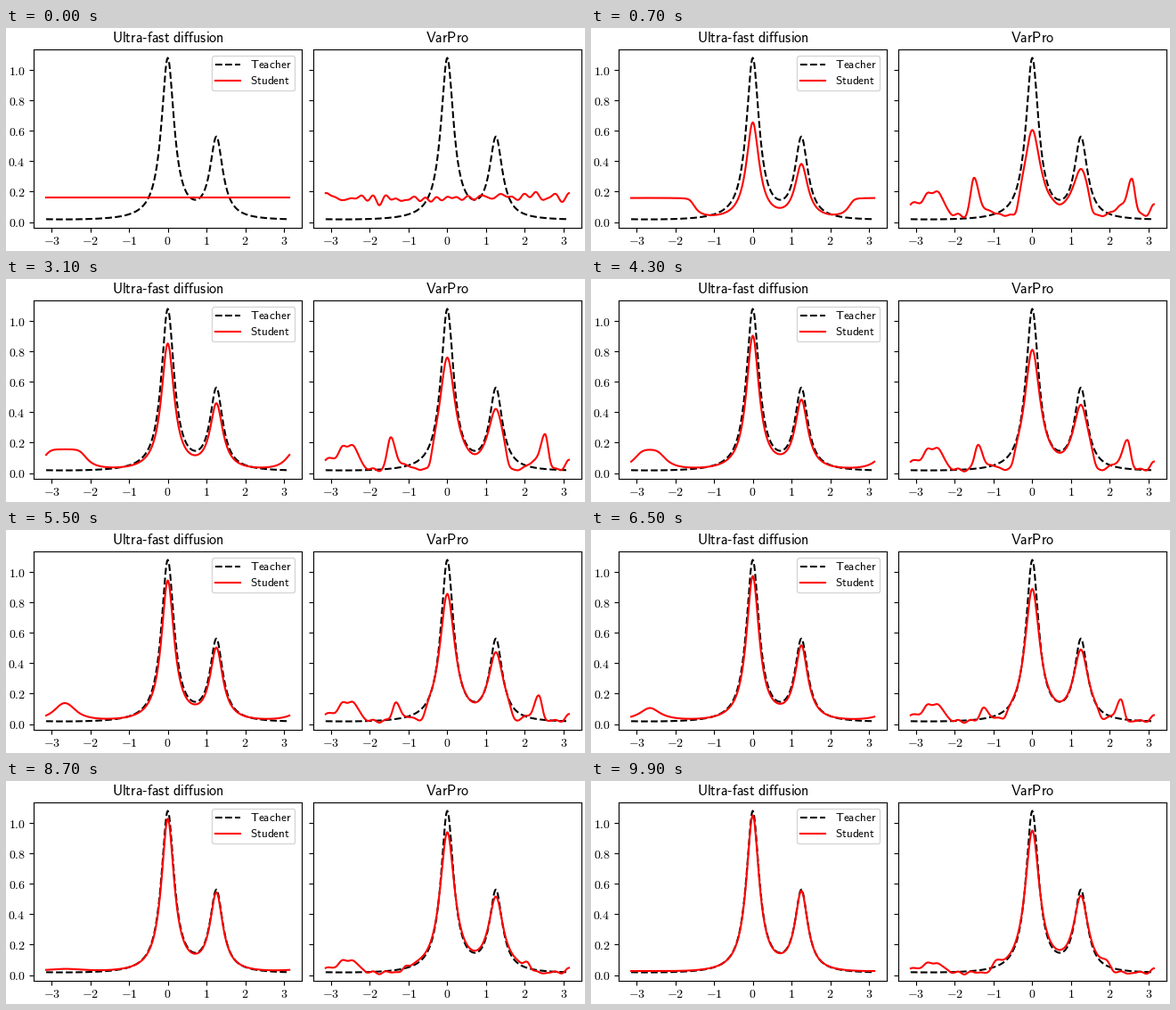
A matplotlib script for the animation above (10000 ms loop, 650 by 250 pixels).

```python
import numpy as np
import matplotlib.pyplot as plt
from matplotlib.animation import FuncAnimation

plt.rcParams.update({"font.family": "Liberation Sans", "mathtext.fontset": "cm"})

FRAMES, INTERVAL = 100, 100
N = 320
MODES = (0.0, 0.4 * np.pi)
UNIFORM = 1 / (2 * np.pi)


def kernel(x, s):
    """Poisson kernel on the circle."""
    return np.sinh(s) / (np.cosh(s) - np.cos(x)) * UNIFORM


def mixture(x, w1, w2, s):
    return w1 * kernel(x - MODES[0], s) + w2 * kernel(x - MODES[1], s)


def diffuse(g, dx, horizon=8.0, steps=480):
    """Implicit Euler for df/dt = -2 (g u_x)_x with u = g / f, from uniform f."""
    eye = np.eye(N)
    grad = (np.roll(eye, 1, axis=1) - eye) / dx
    mid = (g + np.roll(g, -1)) / 2
    flow = 2 * grad.T @ (mid[:, None] * grad)
    times = horizon * np.linspace(0, 1, steps + 1) ** 3
    f = np.full(N, UNIFORM)
    states = [f]
    for dt in np.diff(times):
        u = g / f
        for _ in range(3):
            residual = g / u - f - dt * (flow @ u)
            du = np.linalg.solve(np.diag(g / u**2) + dt * flow, residual)
            u = np.maximum(u + du, u / 3)
        f = g / u
        states.append(f)
    return times, np.array(states)


xs = np.linspace(-np.pi, np.pi, N + 1)
teacher = mixture(xs, 2 / 3, 1 / 3, 0.2)
times, states = diffuse(teacher[:-1], xs[1] - xs[0])
peaks = states[:, N // 2]

# A few heights of the main peak set the clock.
marks = np.interp([UNIFORM, 0.711, 0.944, 1.05], peaks, times)
clock = np.interp(np.arange(FRAMES), [0, 11, 55, 99], marks)


def diffusion_curve(i):
    k = np.interp(clock[i], times, np.arange(len(times)))
    lo = min(int(k), len(times) - 2)
    f = states[lo] + (k - lo) * (states[lo + 1] - states[lo])
    return np.append(f, f[0])


# Untrained network: a slow swell under random ripples.
rng = np.random.default_rng(4)
ripple = 0.0042 * sum(np.cos(k * xs + rng.uniform(0, 2 * np.pi))
                      for k in range(6, 25))
start = UNIFORM + 0.01 * np.cos(xs - 2) + ripple


def bump(center, height, left, right=None):
    d = xs - center
    width = np.where(d < 0, left, right or left)
    return height * np.exp(-0.5 * (d / width) ** 2)


def step(edge, scale=0.04):
    return 0.5 * (1 + np.tanh((xs - edge) / (2 * scale)))


def network_curve(i):
    p = max(0.0, (i - 15) / (FRAMES - 16))

    def fade(a, b):
        return a + (b - a) * p

    def settle(a, b):
        return a + (b - a) * (1 - (1 - p) ** 1.7)

    def drift(a, b):
        return a + (b - a) * p ** 1.6

    # Fitted region around the modes, spreading outwards
    core = mixture(xs, settle(0.523, 0.665), settle(0.277, 0.348),
                   settle(0.25, 0.228))
    core += bump(0.72, fade(-0.03, 0), 0.2)
    window = step(drift(-0.37, -1.07)) * (1 - step(drift(1.51, 2.04)))
    f = core * window + (fade(0.026, 0.016) + 0.3 * ripple) * (1 - window)

    # Hump on the left, small rise at the right end
    f += bump(-3.03, settle(0.09, 0.025), 0.15)
    f += bump(-2.72, fade(0.13, 0.055), 0.1)
    f += bump(-2.45, fade(0.18, 0.06), 0.15)
    f += bump(3.14, settle(0.07, 0.02), 0.09)

    # Spikes drifting inwards, each with a tail
    a, b = drift(-1.5, -0.93), drift(2.57, 1.92)
    f += bump(a, settle(0.285, 0.035), 0.085, 0.11)
    f += bump(a + 0.32, fade(0.045, 0), 0.14)
    f += bump(b, fade(0.28, 0.03), 0.11, 0.08)
    f += bump(b - 0.3, fade(0.055, 0), 0.15)

    peak = np.interp(clock[i], times, peaks)
    mix = min(1.0, (peak - UNIFORM) / (0.745 - UNIFORM))
    return start + mix * (f - start)


def sans(text):
    return r"$\mathsf{%s}$" % text.replace(" ", r"\ ")


fig = plt.figure(figsize=(6.5, 2.5), dpi=100)


def panel(left, title, y_labels):
    ax = fig.add_axes([left / 650, 26 / 250, 300.4 / 650, 200 / 250])
    ax.set_title(title, fontsize=11.6)
    ax.set_xlim(-1.1 * np.pi, 1.1 * np.pi)
    ax.set_ylim(-0.038, 1.135)
    xt, yt = np.arange(-3, 4), np.arange(6) / 5
    ax.set_xticks(xt, [f"${v}$" for v in xt])
    ax.set_yticks(yt, [f"${v:.1f}$" if y_labels else "" for v in yt])
    ax.tick_params(axis="x", pad=2.2)
    ax.plot(xs, teacher, "k--", label=sans("Teacher"))
    line, = ax.plot(xs, teacher, "r-", label=sans("Student"))
    return ax, line


# A Unicode hyphen keeps mathtext from drawing a minus sign.
ax1, line1 = panel(31.4, sans("Ultra") + "\u2010" + sans("fast diffusion"), True)
ax2, line2 = panel(345.2, sans("VarPro"), False)
ax1.legend(loc="upper right", fontsize=9.6, borderpad=0.3, labelspacing=0.38,
           handlelength=2.08, handletextpad=0.83, borderaxespad=0.55)


def draw(i):
    line1.set_ydata(diffusion_curve(i))
    line2.set_ydata(network_curve(i))
    return line1, line2


anim = FuncAnimation(fig, draw, frames=FRAMES, interval=INTERVAL,
                     repeat=True, repeat_delay=0)
plt.show()
```
